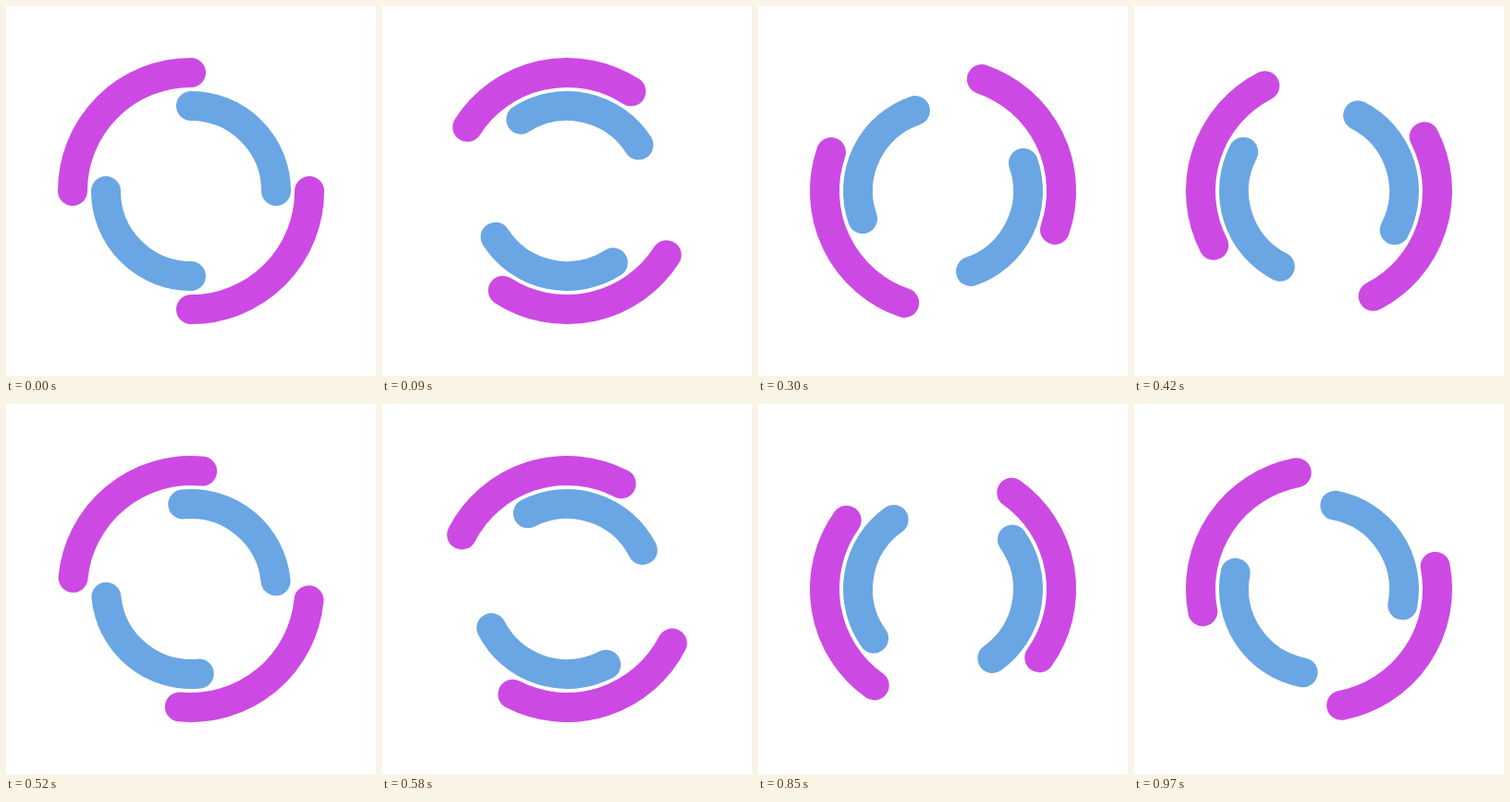
An HTML page that plays this animation: 400 px wide and 400 px high, repeating every 1000 ms.

```html
<!DOCTYPE html>
<html lang="en">
<head>
<meta charset="utf-8">
<title>Double ring spinner</title>
<style>
  html, body { margin: 0; height: 100%; overflow: hidden; background: #fff; }
  svg { display: block; width: 100%; height: 100%; }
</style>
</head>
<body>
<svg viewBox="-200 -200 400 400" fill="none" stroke-width="32" stroke-linecap="round">
  <path id="outer" stroke="#cc4ae3" d="M-128 0A128 128 0 0 1 0-128M128 0A128 128 0 0 1 0 128"/>
  <path id="inner" stroke="#6aa6e3" d="M0-92A92 92 0 0 1 92 0M0 92A92 92 0 0 1-92 0"/>
</svg>
<script>
  const LOOP = 1000, STEPS = 33, TICK = 10;
  const outer = document.getElementById("outer");
  const inner = document.getElementById("inner");

  // The turn advances in even steps whose start times are rounded to whole ticks.
  function draw() {
    const tick = Math.floor(performance.now() % LOOP / TICK);
    const step = Math.floor((tick + 0.5) * TICK * STEPS / LOOP);
    const angle = step * 360 / STEPS;
    outer.setAttribute("transform", `rotate(${angle})`);
    inner.setAttribute("transform", `rotate(${-angle})`);
    requestAnimationFrame(draw);
  }
  draw();
</script>
</body>
</html>
```
